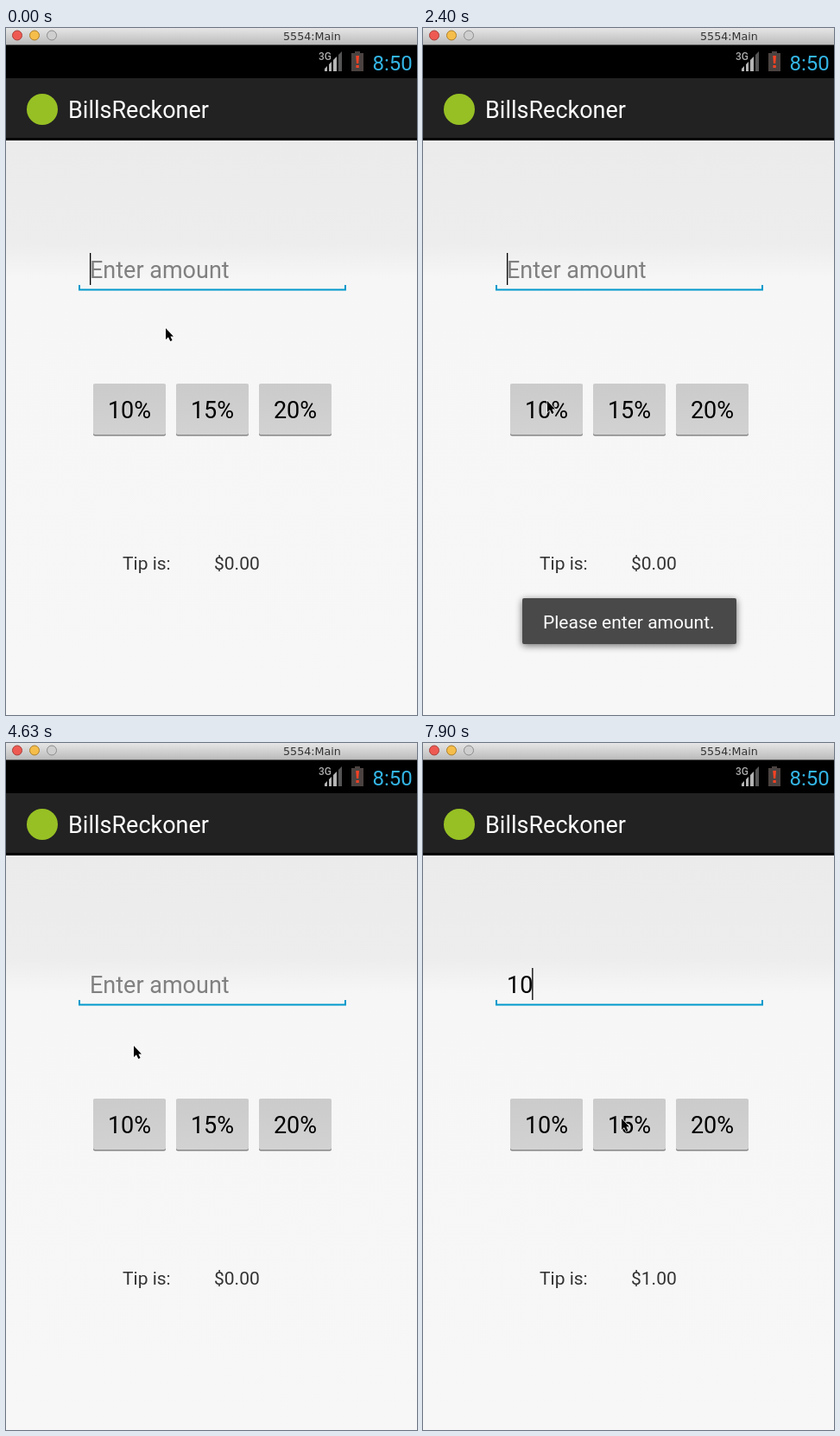
An HTML page that plays this animation: 476 by 794 pixels, repeating every 8000 ms.

```html
<!DOCTYPE html>
<html lang="en">
<head>
<meta charset="utf-8">
<title>Tip calculator demo</title>
<style>
  html, body { margin: 0; width: 100%; height: 100%; overflow: hidden; background: #f7f7f7; }
  svg { display: block; width: 100%; height: 100%; font-family: Roboto, sans-serif; }
  .large { font-size: 27px; }
  .small { font-size: 21px; }
  #toast rect { filter: drop-shadow(0 2px 4px rgba(0, 0, 0, .65)); }
</style>
</head>
<body>
<svg viewBox="0 0 476 794">
  <defs>
    <linearGradient id="bar" x2="0" y2="1">
      <stop stop-color="#e6e6e6"/><stop offset="1" stop-color="#b9b9b9"/>
    </linearGradient>
    <linearGradient id="page" x2="0" y2="1">
      <stop stop-color="#ebebeb"/><stop offset=".18" stop-color="#ededed"/>
      <stop offset=".24" stop-color="#f6f6f6"/><stop offset="1" stop-color="#f7f7f7"/>
    </linearGradient>
    <linearGradient id="key" x2="0" y2="1">
      <stop stop-color="#cbcbcb"/><stop offset="1" stop-color="#d2d2d2"/>
    </linearGradient>
  </defs>

  <!-- window title -->
  <rect width="476" height="20" fill="url(#bar)"/>
  <g stroke-width="1">
    <circle cx="13" cy="8.5" r="5.5" fill="#ee5a52" stroke="#a8413c"/>
    <circle cx="33" cy="8.5" r="5.5" fill="#f5bd4a" stroke="#ab7f2c"/>
    <circle cx="53" cy="8.5" r="5.5" fill="#cfcfcf" stroke="#8c8c8c"/>
  </g>
  <text x="321" y="14" font-size="12.7" font-family="DejaVu Sans, sans-serif" fill="#333">5554:Main</text>

  <!-- status bar -->
  <rect y="19.5" width="476" height="39" fill="#000"/>
  <text x="362" y="37" font-size="12" font-weight="500" fill="#aaa">3G</text>
  <path d="M369 50V47L372 44V50ZM374 50V42L377 39V50ZM379 50V37L383 33V50Z" fill="#b4b4b4"/>
  <path d="M385 50V31L389 27V50Z" fill="#555"/>
  <path d="M404 27h6v2h4v21h-14v-21h4z" fill="#4b4341"/>
  <path d="M405.3 32h3.6l-.7 9h-2.2zM405.5 43h3.2v3h-3.2z" fill="#ff4223"/>
  <text x="424.5" y="48.5" font-size="24" fill="#33b5e5">8:50</text>

  <!-- action bar and page -->
  <rect y="58" width="476" height="70" fill="#222"/>
  <rect y="127" width="476" height="3" fill="#000"/>
  <rect y="130" width="476" height="664" fill="url(#page)"/>
  <rect y="130" width="476" height="2" fill="#f7f5f6"/>
  <circle cx="42" cy="94" r="18" fill="#97c024"/>
  <text class="large" x="72" y="104" fill="#fff">BillsReckoner</text>

  <!-- amount field -->
  <text class="large" id="amount" x="97" y="289"></text>
  <path d="M85 297V302.5H393V297" fill="none" stroke="#0099cc" stroke-width="2"/>
  <rect id="caret" y="260" width="1.3" height="37"/>

  <g id="keys"></g>

  <text class="small" x="135" y="626" fill="#333">Tip is:</text>
  <text class="small" id="tip" x="241" y="626" fill="#333"></text>

  <g id="toast">
    <rect x="115" y="659" width="248" height="53" rx="2" fill="#303030"/>
    <text class="small" x="139" y="694" fill="#fff">Please enter amount.</text>
  </g>
  <path id="pointer" d="M0 0V13L3 10.2L5.3 15L7.6 14L5.4 9.4H9Z" stroke="#fff" stroke-width="1.2" paint-order="stroke"/>
</svg>
<script>
  const LOOP = 8000, TICK = 149;
  const $ = id => document.getElementById(id);
  const clamp = v => Math.max(0, Math.min(1, v));

  // Ticks at which the caret turns on or off, starting from on
  const blinks = [3, 7, 10, 13, 17, 20, 23, 27, 31, 35, 40, 44, 47, 50];

  // Pointer path: tick, x, y
  const path = [
    [4, 185, 347], [10, 144, 431],
    [19, 144, 431], [21, 145, 387], [24, 148, 350],
    [39, 148, 350], [40, 145, 376], [43, 144, 436],
    [49, 144, 436], [53, 230, 434]
  ];

  $('keys').innerHTML = [10, 15, 20].map((rate, i) => {
    const x = 101 + 96 * i;
    return `<rect class="glow" x="${x - 6}" y="405" width="96" height="72" rx="5" fill="#a0daef"/>
      <rect x="${x}" y="412" width="84" height="59.5" rx="2" fill="#858585"/>
      <rect class="face" x="${x}" y="411" width="84" height="59" rx="2"/>
      <text class="large" x="${x + 42}" y="451" text-anchor="middle">${rate}%</text>`;
  }).join('');
  const glows = document.querySelectorAll('.glow');
  const faces = document.querySelectorAll('.face');

  function pointerAt(k) {
    const i = path.findIndex(p => p[0] >= k);
    if (i < 0) return path[path.length - 1].slice(1);
    if (i === 0) return path[0].slice(1);
    const [a, ax, ay] = path[i - 1], [b, bx, by] = path[i];
    const u = (k - a) / (b - a);
    return [ax + (bx - ax) * u, ay + (by - ay) * u];
  }

  function toastAlpha(t) {
    const shown = clamp((t - 2130) / 420), gone = clamp((t - 4040) / 500);
    return (1 - (1 - shown) ** 2) * (1 - gone ** 2);
  }

  function draw(t) {
    const k = Math.floor(t / TICK);
    const typed = k < 35 ? '' : k < 37 ? '1' : '10';
    const pressed = k === 13 || k === 46;

    $('amount').textContent = typed || 'Enter amount';
    $('amount').setAttribute('fill', typed ? '#000' : '#808080');
    $('caret').setAttribute('x', 97 + 14.6 * typed.length);
    $('caret').setAttribute('opacity', blinks.filter(b => b <= k).length % 2 ? 0 : 1);

    faces.forEach((face, i) => {
      const lit = pressed && i === 0;
      face.setAttribute('fill', lit ? '#44b9e8' : 'url(#key)');
      glows[i].setAttribute('opacity', lit ? 1 : 0);
    });

    $('tip').textContent = k < 47 ? '$0.00' : '$1.00';
    $('toast').setAttribute('opacity', toastAlpha(k * TICK + 14));
    $('pointer').setAttribute('transform', `translate(${pointerAt(k).map(Math.round)})`);
  }

  const start = performance.now();
  function frame() {
    draw((performance.now() - start) % LOOP);
    requestAnimationFrame(frame);
  }
  frame();
</script>
</body>
</html>
```
